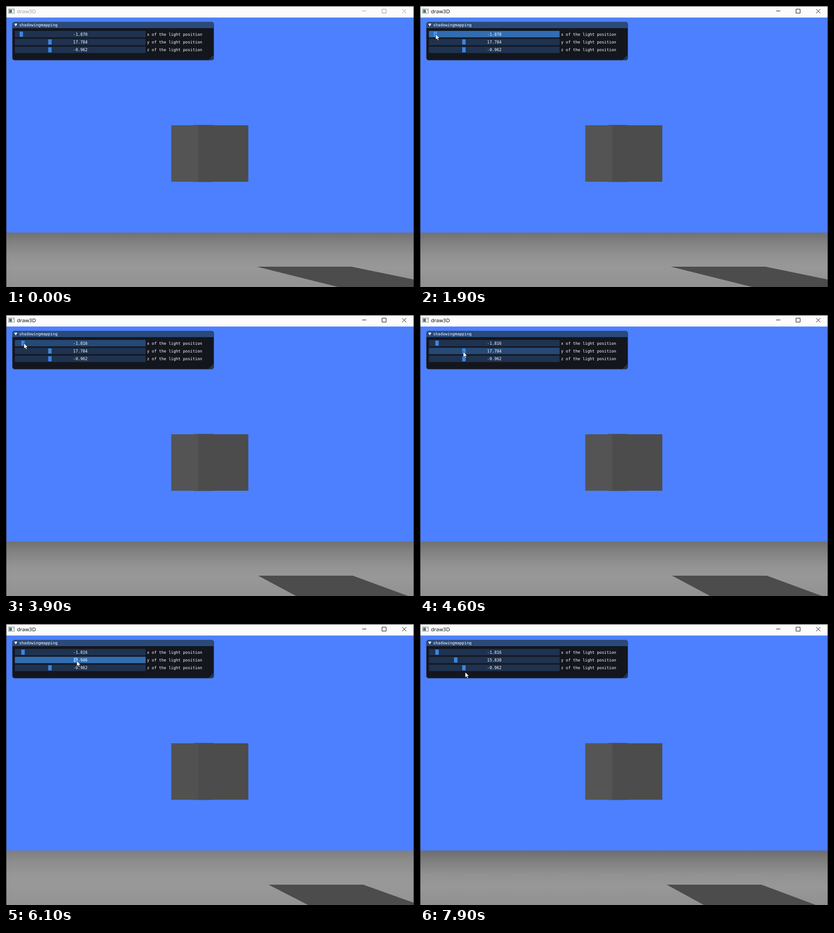
These frames come from a looping animation (900x622 px, 8000 ms). An HTML page:

```html
<!DOCTYPE html>
<html lang="en">
<head>
<meta charset="utf-8">
<title>draw3D</title>
<style>
  html, body { margin: 0; width: 100%; height: 100%; overflow: hidden; background: #4c80ff; }
  svg { display: block; width: 900px; height: 622px; }
  .mono { font: 8.8px "DejaVu Sans Mono", monospace; fill: #fff; white-space: pre; }
  .title { font: 11.5px "Open Sans", "Noto Sans", sans-serif; }
</style>
</head>
<body>
<svg viewBox="0 0 900 622" xmlns="http://www.w3.org/2000/svg">
  <defs>
    <linearGradient id="ground" x1="0" y1="0" x2="0" y2="1">
      <stop offset="0"/><stop offset=".2"/><stop offset=".45"/><stop offset=".65"/><stop offset="1"/>
    </linearGradient>
    <clipPath id="round"><rect x="14" y="35.5" width="444.5" height="84.5" rx="5"/></clipPath>
  </defs>

  <!-- scene -->
  <rect y="25" width="900" height="478" fill="#4c80ff"/>
  <rect y="501.5" width="900" height="120.5" fill="url(#ground)"/>
  <polygon id="shadow" fill="#4c4c4c"/>
  <rect x="414.5" y="263.3" width="43" height="126.2" fill="#4a4a4a"/>
  <rect x="424" y="264" width="110.5" height="125" fill="#4c4c4c"/>
  <rect id="side" x="364.5" y="264" width="59.5" height="125"/>

  <!-- window frame -->
  <rect width="900" height="25.5" fill="#fcfcfc"/>
  <path d="M.5 622V.5H899.5V622" fill="none" stroke="#1c1c1c"/>
  <rect x="5.5" y="6.5" width="13" height="9.5" fill="#f4f4f4" stroke="#8a8a8a"/>
  <rect x="7" y="8" width="6" height="7" fill="#3f8078"/>
  <path d="M16.5 8v3" stroke="#888"/>
  <g id="chrome">
    <text class="title" x="24" y="16" fill="currentColor">draw3D</text>
    <path d="M785.5 11h9.5M829.5 7h9v8.8h-9zM874 7l9 9M883 7l-9 9" fill="none" stroke="currentColor"/>
  </g>

  <!-- panel -->
  <g clip-path="url(#round)">
    <rect x="14" y="35" width="445" height="86" fill="#13161d"/>
    <rect x="14" y="35" width="445" height="14" fill="#294a7a"/>
    <path d="M446 120L458.5 107.5V120z" fill="#1f3553"/>
  </g>
  <rect x="14" y="35.5" width="444.5" height="84.5" rx="5" fill="none" stroke="#414a62" stroke-width=".8"/>
  <path d="M18 39h7l-3.5 6.2z" fill="#fff"/>
  <text class="mono" x="29" y="45.3">shadowingmapping</text>
  <g id="sliders"></g>

  <path id="cursor" d="M0 0V12.3L2.9 9.6 4.9 14 6.9 13.1 5 8.9H8.9z" fill="#fff" stroke="#000" stroke-width=".7"/>
</svg>
<script>
const $ = id => document.getElementById(id);
const LOOP = 8000, STEP = 100;
const TRACK = { idle: '#1f324f', hover: '#264975', active: '#326cb1' };

const smooth = u => (1 - Math.cos(u * Math.PI)) / 2;
const out = u => Math.sin(u * Math.PI / 2);
// eased progress from 0 to 1 between two times
const ramp = (t, from, to, ease = smooth) =>
  ease(Math.min(1, Math.max(0, (t - from) / (to - from))));

const lightX = t => -1.870 + .022 * ramp(t, 2300, 2600) + .043 * ramp(t, 3100, 3300)
  - .011 * ramp(t, 3800, 3900);
const lightY = t => 17.784 + 6.34074 * ramp(t, 4700, 6350, out)
  - 7.71974 * ramp(t, 6350, 7200) - .567 * ramp(t, 7200, 7500);

// the pointer flies in, then follows whichever slider it drags
const pointer = t => {
  const enter = ramp(t, 400, 1000, out);
  return {
    x: 893 - 743 * enter - 98 * ramp(t, 1000, 1300) - 17.5 * ramp(t, 1300, 1800)
      + 93 * (lightX(t) + 1.870) + 58 * ramp(t, 3900, 4700)
      + 9.5 * (lightY(t) - 17.784) + 20.5 * ramp(t, 7600, 7900),
    y: 134.4 - 101 * enter + 35 * ramp(t, 1000, 1400) - 6 * ramp(t, 1400, 1800)
      + 19 * ramp(t, 3900, 4600) + 7 * ramp(t, 6000, 7200) + 18 * ramp(t, 7600, 7900)
  };
};

const PX = .755;  // size of one interface unit
const sliders = [['x', -2, 4], ['y', 10, 30], ['z', -2, 4]].map(([name, min, range], i) => {
  const top = 55.1 + i * 23 * PX, height = 19 * PX;
  const g = document.createElementNS('http://www.w3.org/2000/svg', 'g');
  g.innerHTML = `<rect x="19.5" y="${top}" width="${382 * PX}" height="${height}"/>
    <rect y="${top + 2 * PX}" width="${10 * PX}" height="${15 * PX}"/>
    <text class="mono" x="164" y="${top + 10.4}" text-anchor="middle"></text>
    <text class="mono" x="311" y="${top + 10.4}">${name} of the light position</text>`;
  $('sliders').append(g);
  const [track, grab, label] = g.children;
  return {
    contains: p => p.x >= 19 && p.x <= 308 && p.y >= top && p.y <= top + height,
    set(value, state) {
      track.setAttribute('fill', TRACK[state]);
      grab.setAttribute('fill', state === 'active' ? '#4296fa' : '#3d85e0');
      grab.setAttribute('x', 19.5 + (2 + (value - min) / range * 368) * PX);
      label.textContent = value.toFixed(3);
    }
  };
});

const gray = v => `rgb(${[v, v, v].map(Math.round)})`;
const stops = [...document.querySelectorAll('#ground stop')];
// base shade of each stop and its change per unit of light height
const shades = [[113, 2.2], [131, 1.6], [147, .6], [152, 0], [145, .3]];

function light(x, y) {
  const dx = x + 1.816, dy = y - 17.784;
  const reach = 76.2 - 1088 / (y - 3.5);
  const far = 556 + reach + dx * 55, near = 640 + 1.15 * reach - dx * 1720;
  $('shadow').setAttribute('points',
    `${far},577 ${far + 209},577 ${near + 247},622 ${near},622`);
  stops.forEach((s, i) => s.setAttribute('stop-color', gray(shades[i][0] + shades[i][1] * dy)));
  $('side').setAttribute('fill', gray(84 - dy * .5));
}

function draw(t) {
  const p = pointer(t);
  const values = [lightX(t), lightY(t), -0.962];
  const held = t >= 1900 && t < 3900 ? 0 : t >= 4700 && t < 7700 ? 1 : -1;
  const shown = t >= 400;
  sliders.forEach((s, i) => {
    const hover = shown && held < 0 && s.contains(p);
    s.set(values[i], i === held ? 'active' : hover ? 'hover' : 'idle');
  });
  light(values[0], values[1]);
  $('chrome').style.color = t >= 1900 ? '#000' : '#999';
  $('cursor').style.display = shown ? '' : 'none';
  $('cursor').setAttribute('transform', `translate(${p.x} ${p.y})`);
}

const start = performance.now();
function tick() {
  const t = (performance.now() - start) % LOOP;
  draw(Math.floor(t / STEP) * STEP);
  requestAnimationFrame(tick);
}
tick();
</script>
</body>
</html>
```
